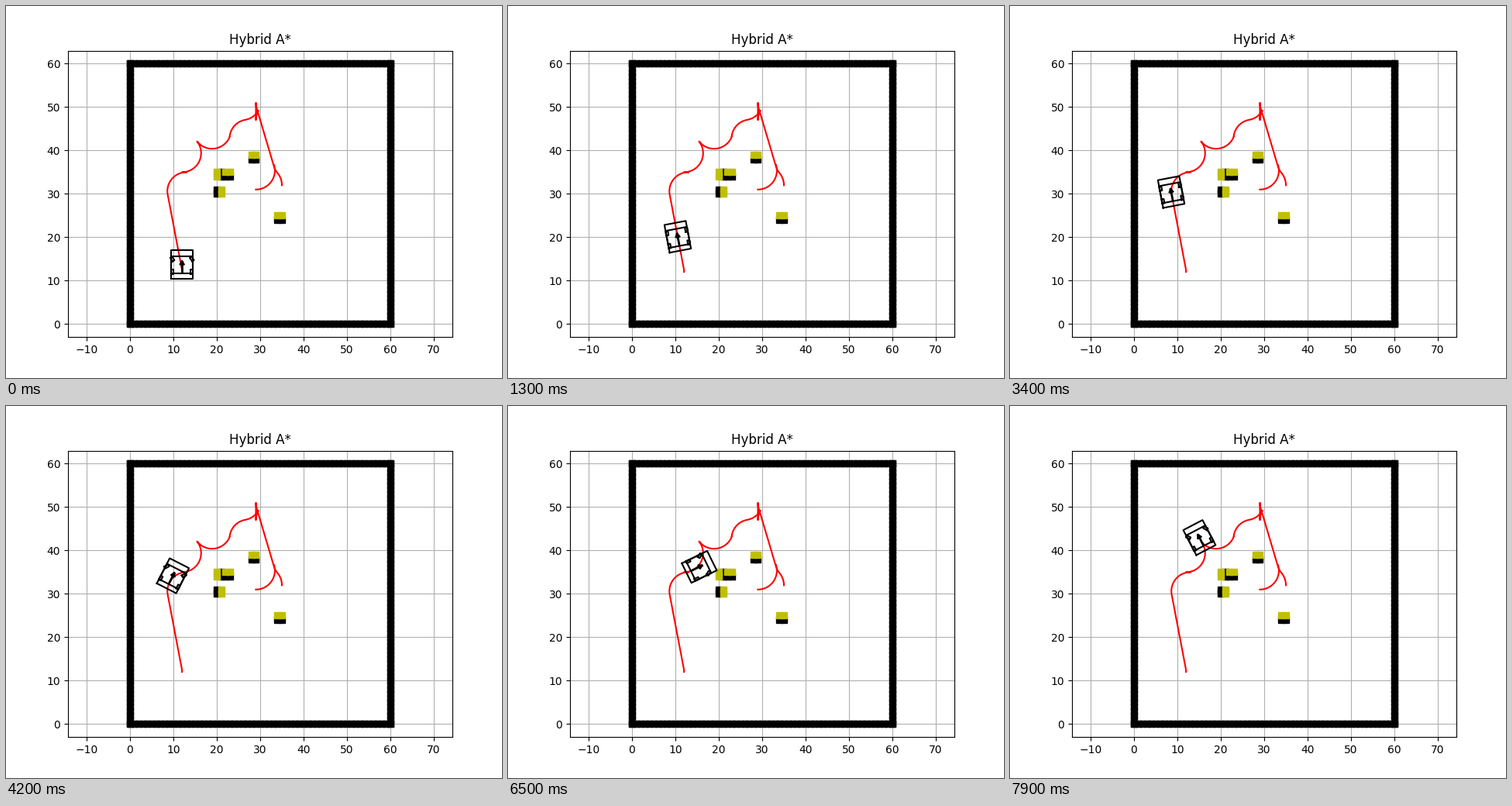
Animation of 640x480 px, one loop 8 s. Source, as a matplotlib script:

```python
import numpy as np
import matplotlib.pyplot as plt
from matplotlib.animation import FuncAnimation

STEP, FRAMES, INTERVAL = 0.5, 80, 100
WB, STEER = 3.0, 0.6                 # wheelbase, full steering angle
R = WB / np.tan(STEER)               # turning radius
REAR, FRONT, WIDTH = -1.5, 5.0, 5.0
TRACK, TIRE_LEN, TIRE_W = 4.5, 1.0, 0.5
STOP, GO = 52, 59                    # the car rests between these steps


def arc(deg):
    return np.radians(deg) * R


def travel(start, moves, dist):
    """Pose (x, y, yaw, turn) after driving dist; moves are (turn, signed length)."""
    x, y, yaw = start
    turn = 0
    for turn, length in moves:
        d = np.sign(length) * min(dist, abs(length))
        if turn:
            new = yaw + turn * d / R
            x += turn * R * (np.sin(new) - np.sin(yaw))
            y -= turn * R * (np.cos(new) - np.cos(yaw))
            yaw = new
        else:
            x += d * np.cos(yaw)
            y += d * np.sin(yaw)
        if dist < abs(length):
            return x, y, yaw, turn
        dist -= abs(length)
    return x, y, yaw, 0


def trace(start, moves):
    knots = np.cumsum([0] + [abs(m[1]) for m in moves])
    ds = np.union1d(np.arange(0, knots[-1], STEP / 2), knots)
    return np.array([travel(start, moves, d)[:2] for d in ds]).T


def pose(x, y, deg):
    return x, y, np.radians(deg)


# Left arc, straight along the inner tangent, right arc
c1, c2 = np.array([12 - R, 12]), np.array([13, 35 - R])
gap = np.hypot(*(c2 - c1))
swing = np.arctan2(*(c2 - c1)[::-1]) + np.arcsin(2 * R / gap) - np.pi / 2
APPROACH = (pose(12, 12, 90), [
    (1, swing * R), (0, np.sqrt(gap**2 - 4 * R**2)), (-1, (swing + np.pi / 2) * R)])
LEAVE = (pose(13, 35, 0), [(0, -1), (1, arc(128)), (-1, -arc(121))])
CLIMB = (pose(22.97, 43.28, 83), [
    (-1, arc(73)), (1, arc(50)), (-1, -arc(30)), (0, 4),
    (-1, -arc(16.45)), (0, -13.94), (-1, -arc(23.55)), (1, -arc(40))])
PARK = (pose(29, 31, 0), [(1, arc(106.45))])


def box(x0, x1, half):
    return np.array([[x0, x0, x1, x1, x0], [half, -half, -half, half, half]])


def rot(a):
    return np.array([[np.cos(a), -np.sin(a)], [np.sin(a), np.cos(a)]])


def car_shapes(x, y, yaw, steer):
    tire = box(-TIRE_LEN / 2, TIRE_LEN / 2, TIRE_W / 2)
    shapes = [box(REAR, FRONT, WIDTH / 2), box(-0.4, 3.6, WIDTH / 2)]
    for side in (-1, 1):
        off = side * TRACK / 2
        shapes.append(tire + [[0], [off]])
        shapes.append(rot(steer) @ tire + [[WB], [off]])
    tip = 0.8 * WB
    barb = 0.3 * tip * np.array([np.cos(np.pi / 6), np.sin(np.pi / 6)])
    shapes.append(np.array([[0, tip], [0, 0]]))
    for side in (-1, 1):
        shapes.append(np.array([[tip, tip - barb[0]], [0, side * barb[1]]]))
    return [rot(yaw) @ s + [[x], [y]] for s in shapes]


fig, ax = plt.subplots(figsize=(6.4, 4.8), dpi=100)
ax.set_title("Hybrid A*")
ax.set_xlim(30 - 310 / 7, 30 + 310 / 7)
ax.set_ylim(-3, 63)
ax.grid(True)

n = np.arange(61)
zero, end = np.zeros(61), np.full(61, 60)
blocks = [(28, 38), (29, 38), (21, 34), (21, 35), (22, 34), (23, 34),
          (20, 30), (20, 31), (34, 24), (35, 24)]
shelves = [(28, 39), (29, 39), (20, 34), (20, 35), (22, 35), (23, 35),
           (21, 30), (21, 31), (34, 25), (35, 25)]
ax.plot(np.r_[n, n, zero, end], np.r_[zero, end, n, n], "sk")
ax.plot(*zip(*blocks), "sk")
ax.plot(*zip(*shelves), "sy")
for route in (APPROACH, LEAVE, CLIMB, PARK):
    ax.plot(*trace(*route), "r", lw=1.5)

car = [ax.plot([], [], "k", lw=1.5 if i < 6 else 2)[0] for i in range(9)]


def update(k):
    if k <= GO:
        x, y, yaw, turn = travel(*APPROACH, STEP * min(k, STOP))
    else:
        x, y, yaw, turn = travel(*LEAVE, STEP * (k - GO))
    for line, (px, py) in zip(car, car_shapes(x, y, yaw, turn * STEER)):
        line.set_data(px, py)
    return car


anim = FuncAnimation(fig, update, frames=FRAMES, interval=INTERVAL,
                     repeat=True, repeat_delay=0)
plt.show()
```
